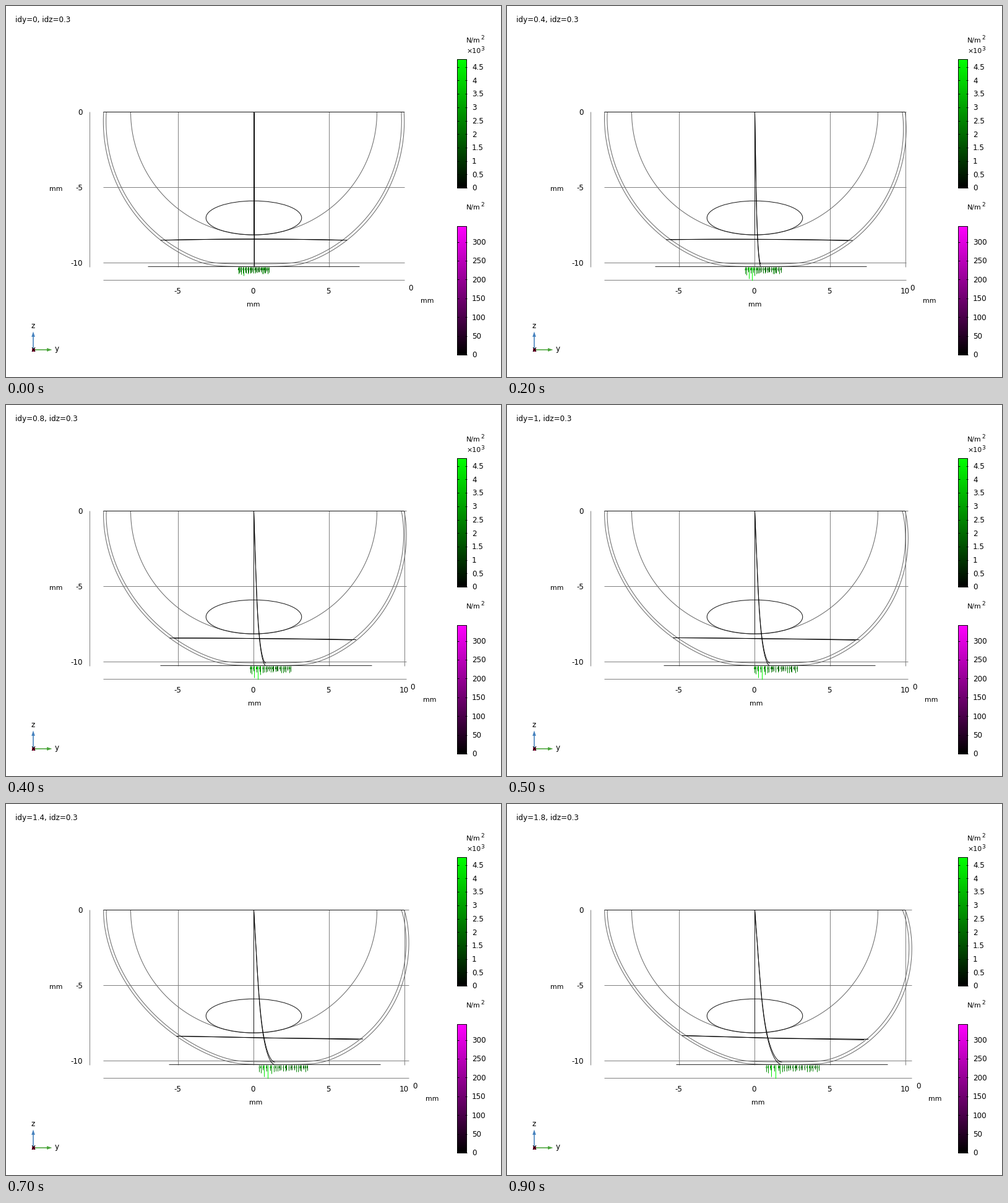
These frames come from a looping animation (800 by 600 pixels, 1 s). A matplotlib script:

```python
import numpy as np
import matplotlib.pyplot as plt
from matplotlib.animation import FuncAnimation
from matplotlib.colors import LinearSegmentedColormap
from matplotlib.patches import Ellipse, Polygon, Rectangle

W, H, DPI = 800, 600, 100
PX = 72 / DPI            # points per pixel
MM = 24.4                # pixels per millimetre
LEFT, TOP = 400, 171     # pixel column and row of the origin
CX, CY = LEFT + 0.5, TOP + 0.5
OUTER_FLOOR, INNER_FLOOR = 421.5, 417.3
MAX_SHIFT = 1.8 * MM
GRID, THIN, DARK = "#808080", "#666666", "#161616"

plt.rcParams["font.family"] = "DejaVu Sans"
fig = plt.figure(figsize=(W / DPI, H / DPI), dpi=DPI, facecolor="white")
ax = fig.add_axes([0, 0, 1, 1])

ARROWS = 27
HEAD = [(-0.32, -1), (0.32, -1), (0, 1)]
rng = np.random.default_rng(4)
arrow_pos = np.linspace(0, 1, ARROWS) + rng.uniform(-0.012, 0.012, ARROWS)
arrow_len = rng.uniform(7, 11, ARROWS)
arrow_gain = 12 * np.exp(-((arrow_pos - 0.16) / 0.12) ** 2) * (np.arange(ARROWS) % 2)


def line(xs, ys, color=THIN, width=1.0, z=2):
    ax.plot(xs, ys, color=color, lw=width * PX, zorder=z, solid_capstyle="butt")


def label(x, baseline, text, size=12, ha="center"):
    ax.text(x, baseline, text, size=size * PX, ha=ha, va="baseline", zorder=6)


def raised(baseline, text, power):
    label(744, baseline, text, 11, "left")
    label(767.3, baseline - 5, power, 9, "left")


def shell(radius, floor, amount):
    """Round shell pressed flat on the plate and dragged to the right."""
    centre = CY + 14.7
    start = np.arcsin((CY - centre) / radius)
    angle = np.linspace(start, np.pi - start, 400)
    bulged = radius + 1.6 * np.clip(np.abs(np.sin(2 * angle)) * np.sin(angle), 0, 1)
    x = CX + bulged * np.cos(angle)
    y = centre + bulged * np.sin(angle)
    y = y - 3 * np.logaddexp(0, (y - floor) / 3)
    depth = np.clip((y - CY) / (OUTER_FLOOR - CY), 0, 1)
    drift = np.where(x > CX, 46 * depth ** 0.8, 50 * depth ** 1.35)
    return x + amount * drift, y


def seam(floor, amount):
    """Middle line of a shell: slight lean, then a sharp bend at the plate."""
    t = np.sin(np.linspace(0, np.pi / 2, 200))
    bend = 1 - np.sqrt(1 - t ** 5)
    drift = amount * (0.41 * t + 0.59 * bend) * MAX_SHIFT
    line(CX + drift, CY + t * (floor - CY), "black", 0.9, 3)


def rim(half_width, sink, amount):
    """Edge of the ring, tilting as the shell is dragged."""
    t = np.linspace(-1, 1, 60)
    tilt = np.where(t < 0, 4.2, sink) * t
    arch = 1.8 * (1 - amount) * (1 - t * t)
    line(CX + half_width * t + 33 * amount, 378.8 + amount * tilt - arch,
         "black", 1, 3)


def color_bar(top, bottom, color, spacing, ticks):
    ramp = LinearSegmentedColormap.from_list("ramp", ["black", color])
    ax.imshow(np.linspace(1, 0, 256)[:, None], cmap=ramp, aspect="auto",
              extent=(729, 745, bottom, top), zorder=2)
    ax.add_patch(Rectangle((729, top), 15, bottom - top, fill=False,
                           ec="black", lw=PX, zorder=3))
    for i, text in enumerate(ticks):
        y = bottom - i * spacing
        line([729, 732], [y, y], "black", z=4)
        line([742, 745], [y, y], "black", z=4)
        label(753, y + 4.4, text, ha="left")


def triad():
    blue, green = "#4682be", "#4ca53c"
    line([44, 44], [556, 533], blue, 1.6)
    line([44, 67], [555.5, 555.5], green, 1.6)
    for tip, color in (([(44, 526.5), (41.2, 535), (46.8, 535)], blue),
                       ([(74.5, 556), (66, 553.2), (66, 558.8)], green)):
        ax.add_patch(Polygon(tip, fc=color, lw=0, zorder=3))
    ax.add_patch(Rectangle((41.8, 553.5), 5, 5, fc="#a00a3c", lw=0, zorder=3))
    label(44, 521, "z")
    label(82.5, 558, "y")
    label(44.3, 559, "x")


def axes_grid(right):
    bottom = OUTER_FLOOR
    line([135, 135], [TOP, bottom], GRID, z=1)
    line([157, right], [443, 443], GRID, z=1)
    for mm in (0, -5, -10):
        y = TOP - mm * MM
        line([157, right], [y, y], GRID, z=1)
        label(124, y + 4.5, str(mm), ha="right")
    for mm in (-5, 0, 5, 10):
        x = LEFT + mm * MM
        if x <= right:
            line([x, x], [TOP, bottom], GRID, z=1)
            label(x - 0.7, 465, str(mm))
    extra = right - 643.5
    label(81, 299, "mm", 11)
    label(400 + extra / 2, 486, "mm", 11)
    label(653.8 + extra, 460, "0")
    label(681 + extra, 480.5, "mm", 11)


def lens_and_ball():
    angle = np.linspace(0, np.pi, 200)
    line(CX + 199 * np.cos(angle), CY + 198.5 * np.sin(angle))
    ax.add_patch(Ellipse((CX, 342.7), 154.5, 55, fill=False, ec=DARK,
                         lw=PX, zorder=3))
    line([LEFT, LEFT], [TOP, 370], DARK, 1, 3)


def arrows(idy):
    left, right = 375 + 24 * idy, 425 + 44 * idy
    x = left + (right - left) * arrow_pos
    length = arrow_len + arrow_gain * min(1, 0.25 + 1.9 * idy)
    colors = [(0, g, 0) for g in np.clip(length / 21, 0, 1)]
    ax.vlines(x, 422, 422 + length, colors=colors, lw=PX, zorder=3)
    ax.scatter(x, np.full(ARROWS, 424.7), s=(5 * PX) ** 2, marker=HEAD,
               c=colors, linewidths=0, zorder=4)


def draw(frame):
    idy = 0.2 * frame
    amount = idy / 1.8
    ax.clear()

    outer = shell(243.2, OUTER_FLOOR, amount)
    axes_grid(outer[0].max())
    line(*outer)
    line(*shell(238.8, INNER_FLOOR, amount))
    line([157, 643], [TOP, TOP], DARK, 1, 3)
    lens_and_ball()
    rim(150.8, 1.6, amount)
    rim(143.8, 2.7, amount)
    seam(OUTER_FLOOR, amount)
    seam(INNER_FLOOR, amount)
    line([229 + MM * idy, 571 + MM * idy], [421, 421], "#303030", 1, 3)
    arrows(idy)

    label(15, 26, f"idy={idy:.2g}, idz=0.3", ha="left")
    raised(59, "N/m", "2")
    raised(76.5, "×10", "3")
    color_bar(86, 294, "#00ff00", 21.7, [f"{i / 2:g}" for i in range(10)])
    raised(329, "N/m", "2")
    color_bar(356, 564, "#ff00ff", 30.4, [str(50 * i) for i in range(7)])
    triad()

    ax.set_xlim(0, W)
    ax.set_ylim(H, 0)
    ax.axis("off")
    return []


anim = FuncAnimation(fig, draw, frames=10, interval=100, repeat=True,
                     repeat_delay=0, init_func=lambda: draw(0))
plt.show()
```
